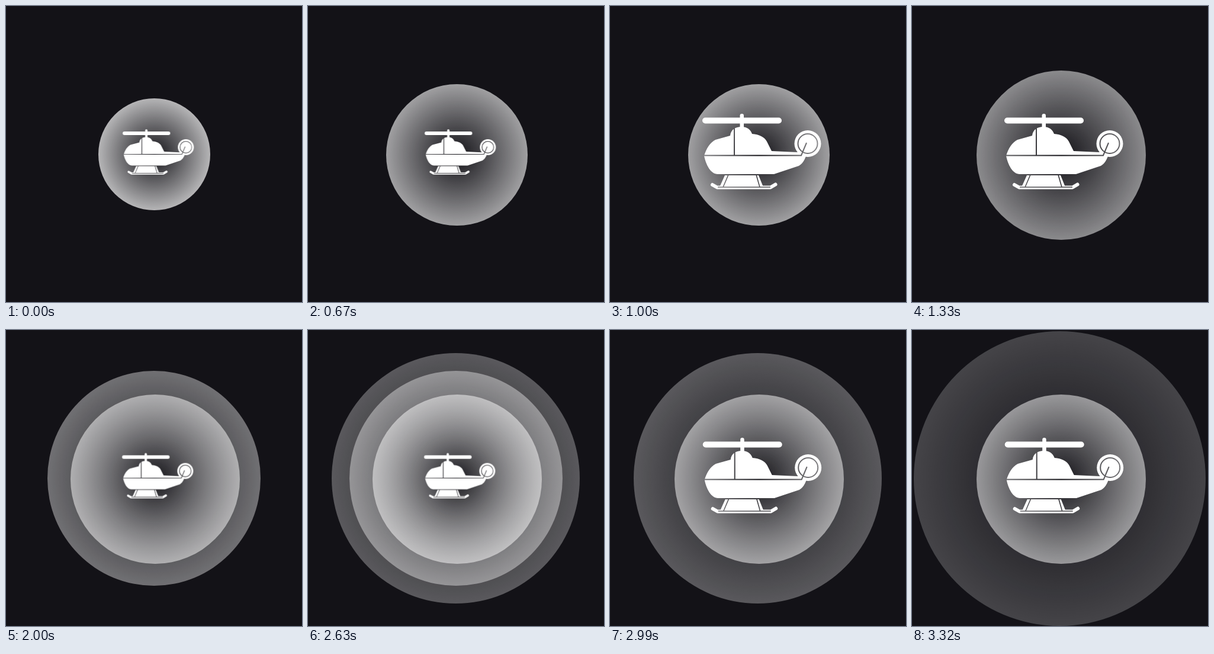
Write an HTML page that moves like this. It is 500 px wide and 500 px high and loops after 3990 ms.

```html
<!DOCTYPE html>
<html lang="en">
<head>
<meta charset="utf-8">
<title>Helicopter pulse</title>
<style>
  html, body { margin: 0; width: 100%; height: 100%; overflow: hidden; background: #131217; }
  svg { display: block; width: 100vw; height: 100vh; }
  .disc, .craft { opacity: 0; animation: 3990ms step-end infinite; }
  .d1 { animation-name: d1; }
  .d2 { animation-name: d2; }
  .d3 { animation-name: d3; }
  .d4 { animation-name: d4; }
  .d5 { animation-name: d5; }
  .d6 { animation-name: d6; }
  .small1 { animation-name: small1; }
  .big1 { animation-name: big1; }
  .small2 { animation-name: small2; }
  .big2 { animation-name: big2; }
  /* 670 = 16.792%, 1000 = 25.063%, 1330 = 33.333%, 2000 = 50.125%,
     2630 = 65.915%, 2660 = 66.667%, 2990 = 74.937%, 3320 = 83.208% */
  @keyframes d1 { 0% { opacity: 1 } 16.792%, 100% { opacity: 0 } }
  @keyframes d2 { 0% { opacity: 0 } 16.792% { opacity: 1 } 33.333%, 100% { opacity: 0 } }
  @keyframes d3 { 0% { opacity: 0 } 33.333%, 100% { opacity: 1 } }
  @keyframes d4 { 0% { opacity: 0 } 50.125% { opacity: 1 } 66.667%, 100% { opacity: 0 } }
  @keyframes d5 { 0% { opacity: 0 } 65.915% { opacity: 1 } 83.208%, 100% { opacity: 0 } }
  @keyframes d6 { 0% { opacity: 0 } 83.208%, 100% { opacity: 1 } }
  @keyframes small1 { 0% { opacity: 1 } 25.063%, 100% { opacity: 0 } }
  @keyframes big1 { 0% { opacity: 0 } 25.063% { opacity: 1 } 50.125%, 100% { opacity: 0 } }
  @keyframes small2 { 0% { opacity: 0 } 50.125% { opacity: 1 } 74.937%, 100% { opacity: 0 } }
  @keyframes big2 { 0% { opacity: 0 } 74.937%, 100% { opacity: 1 } }
</style>
</head>
<body>
<svg viewBox="0 0 500 500">
  <defs>
    <radialGradient id="glow">
      <stop offset="0" stop-color="#fff" stop-opacity="0"/>
      <stop offset="1" stop-color="#fff"/>
    </radialGradient>
    <mask id="seams" maskUnits="userSpaceOnUse" x="140" y="170" width="230" height="150">
      <rect x="140" y="170" width="230" height="150" fill="#fff"/>
      <g fill="none" stroke="#000" stroke-width="2">
        <path d="M210 206V252M158 252.5H323L332 231"/>
        <path d="M200 285L191 306M247 285L253 306M182 306H271" stroke-width="1.6"/>
        <circle cx="334" cy="232.500" r="16.500"/>
      </g>
    </mask>
    <g id="heli" fill="#fff" mask="url(#seams)">
      <rect x="156" y="188.500" width="134" height="10" rx="5"/>
      <rect x="219.500" y="182" width="6.500" height="28" rx="3.200"/>
      <path d="M159 253C163 240 169 231 178 226L203 219C204 209 212 204 222 204C231 204 237 208 240 216C252 217 261 221 265 229L273 245L316 247Q323 246 325 238L334 240Q331 263 319 270L277 284H182C170 284 162 268 159 253Z"/>
      <circle cx="334" cy="232.500" r="22.500"/>
      <path d="M194 286H251L259 306H185Z"/>
      <path d="M173 302L181 306.500H271L279.500 301.500" fill="none" stroke="#fff" stroke-width="6" stroke-linecap="round" stroke-linejoin="round"/>
    </g>
  </defs>
  <g fill="url(#glow)">
    <g class="disc d6"><ellipse cx="249.500" cy="251" rx="246.500" ry="249" fill-opacity=".21"/></g>
    <g class="disc d5"><ellipse cx="249.500" cy="250.500" rx="209.500" ry="211.500" fill-opacity=".3"/></g>
    <g class="disc d4"><ellipse cx="250" cy="250.500" rx="180" ry="181.500" fill-opacity=".4"/></g>
    <g class="disc d3"><circle cx="252" cy="252" r="143" fill-opacity=".51"/></g>
    <g class="disc d2"><circle cx="251.500" cy="251.500" r="119.500" fill-opacity=".6"/></g>
    <g class="disc d1"><circle cx="250.500" cy="250.500" r="94.500" fill-opacity=".69"/></g>
  </g>
  <g class="craft small1"><use href="#heli" transform="translate(103.400 99) scale(.6)"/></g>
  <g class="craft big1"><use href="#heli"/></g>
  <g class="craft small2"><use href="#heli" transform="translate(102.400 98.600) scale(.6)"/></g>
  <g class="craft big2"><use href="#heli" transform="translate(.7 0)"/></g>
</svg>
</body>
</html>
```
